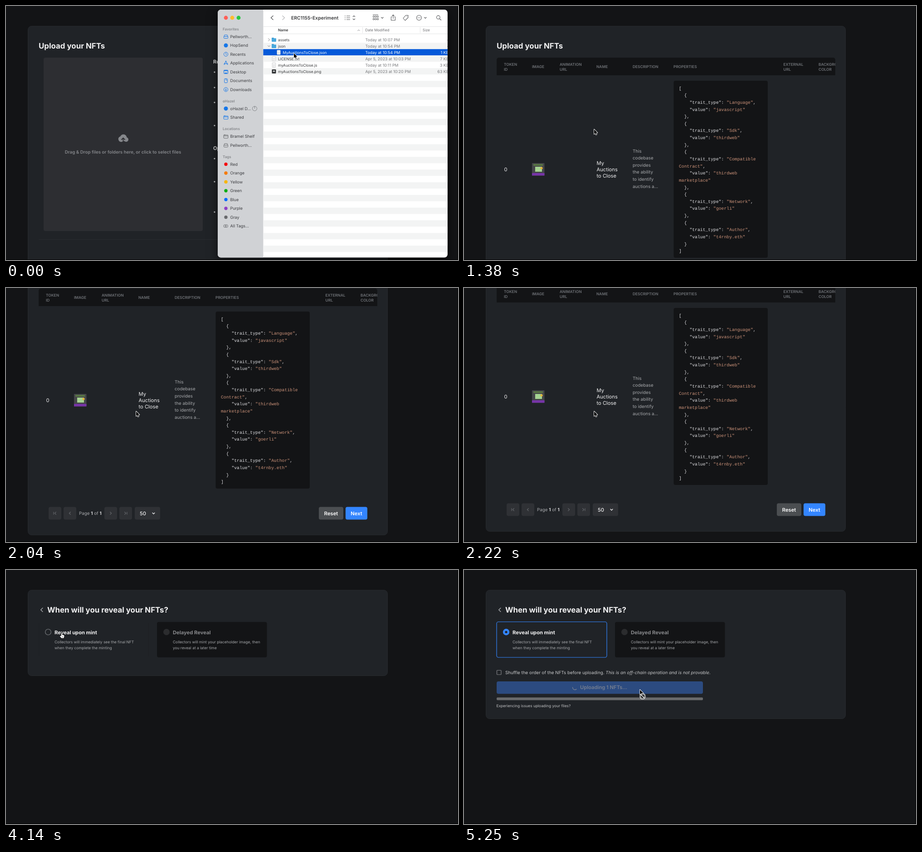
An HTML page with a canvas that plays this animation: 997 px wide and 561 px high, repeating every 5730 ms.

```html
<!DOCTYPE html>
<html lang="en">
<head>
<meta charset="utf-8">
<style>
html, body { margin: 0; width: 100%; height: 100%; overflow: hidden; background: #131416; }
canvas { display: block; }
</style>
</head>
<body>
<canvas id="stage" width="997" height="561"></canvas>
<script>
const ctx = document.getElementById('stage').getContext('2d');
ctx.textRendering = 'geometricPrecision';
const LOOP = 5730;
const SANS = 'Inter, "Open Sans", sans-serif';
const MONO = '"Liberation Mono", "DejaVu Sans Mono", monospace';
const DARK = '#131416', CARD = '#202327', EDGE = '#272a2e', BLUE = '#3385ff', WHITE = '#f1f1f2', GREY = '#a7a9ac';
const TITLE = 16.87, BODY = 11.2;

// ---- drawing helpers ----
function box(x, y, w, h, r, fill, stroke, lw = 1) {
  ctx.beginPath();
  ctx.roundRect(x, y, w, h, r);
  if (fill) { ctx.fillStyle = fill; ctx.fill(); }
  if (stroke) { ctx.strokeStyle = stroke; ctx.lineWidth = lw; ctx.stroke(); }
}
function card(h) {
  box(48.5, 44.5, 793, h - 1, 8, CARD, EDGE);
}
function dot(x, y, r, fill, stroke, lw = 1) {
  box(x - r, y - r, 2 * r, 2 * r, r, fill, stroke, lw);
}
function line(color, lw, ...paths) {
  ctx.strokeStyle = color;
  ctx.lineWidth = lw;
  ctx.beginPath();
  for (const p of paths)
    for (let i = 0; i < p.length; i += 2) ctx[i ? 'lineTo' : 'moveTo'](p[i], p[i + 1]);
  ctx.stroke();
}
function poly(points, fill, stroke, lw = 1) {
  ctx.beginPath();
  for (let i = 0; i < points.length; i += 2) ctx.lineTo(points[i], points[i + 1]);
  ctx.closePath();
  if (stroke) { ctx.strokeStyle = stroke; ctx.lineWidth = lw; ctx.stroke(); }
  ctx.fillStyle = fill;
  ctx.fill();
}
// Text whose capitals are centred on y.
function text(s, x, y, size, color = WHITE, weight = 400, align = 'left', family = SANS) {
  ctx.font = `${weight} ${size}px ${family}`;
  ctx.fillStyle = color;
  ctx.textAlign = align;
  ctx.fillText(s, x, y + size * 0.36);
}
function chevron(x, y, dx, dy, color, lw = 1.2) {
  line(color, lw, dx ? [x - dx, y - dy, x + dx, y, x - dx, y + dy] : [x - dy, y - dy / 2, x, y + dy / 2, x + dy, y - dy / 2]);
}
function clipped(x, y, w, h, r, draw) {
  ctx.save();
  ctx.beginPath();
  ctx.roundRect(x, y, w, h, r);
  ctx.clip();
  draw();
  ctx.restore();
}

// ---- motion helpers ----
const part = (t, a, b) => Math.min(1, Math.max(0, (t - a) / (b - a)));
const inOut = p => p < 0.5 ? 4 * p ** 3 : 1 - (2 - 2 * p) ** 3 / 2;
const out = p => 1 - (1 - p) ** 3;
const moves = [
  [510, 1000, 286, 272],
  [2300, 2800, 785, 486],
  [3680, 4120, 121, 139],
  [4270, 4700, 387, 264]
];
function pointer(t) {
  let x = 634, y = 104;
  for (const [a, b, tx, ty] of moves) {
    const p = inOut(part(t, a, b));
    x += (tx - x) * p;
    y += (ty - y) * p;
  }
  return [x, y];
}

// ---- cursors ----
function arrow(x, y) {
  ctx.save();
  ctx.translate(x + 0.5, y + 0.3);
  ctx.lineJoin = 'round';
  poly([0.6, 0.2, 0.6, 10.6, 3, 8.5, 4.6, 12, 6.2, 11.3, 4.7, 7.9, 7.9, 7.6], '#000', '#fff', 1.8);
  ctx.restore();
}
function hand(x, y) {
  ctx.save();
  ctx.translate(x + 1.5, y);
  ctx.lineJoin = 'round';
  poly([-.8, 0, .8, 0, 1.2, 4, 5.6, 5, 6, 7, 5, 11.5, -.2, 11.5, -3.6, 7.4, -3, 6, -.8, 7.2], '#fff', '#000', 1.4);
  line('#555', .6, [1.4, 7, 1.4, 10], [3.2, 7, 3.2, 10]);
  ctx.restore();
}

// ---- upload page ----
const notes = [
  [146, 'Files must contain one .csv or .json file with', 'metadata.'],
  [180, 'The csv must have a name column, which', 'defines the name of the NFT.'],
  [213, 'Asset names must be sequential 0,1,2,3...n', 'with a matching extension. It does not matter', 'at which number you begin.'],
  [264, 'Make sure to drag and drop the files and the', 'assets at the same time.'],
  [337, 'If you want to map your media files to your', 'NFTs, you can add the name of your files to', 'the image and animation_url column.'],
  [388, 'When uploading files, we will upload them and', 'pin them to IPFS automatically for you. If you', 'already have the files uploaded, you can add', 'the URL to the image column.'],
  [455, 'If you want to make your own collection, add', 'an external_url column.']
];
function uploadPage(over) {
  card(615);
  text('Upload your NFTs', 72, 88, TITLE, WHITE, 700);
  box(83, 114, 351, 383, 4, '#2d2e32');
  for (const [x, y, r] of [[254, 294, 6.2], [259, 291, 7.5], [265, 295, 5]]) dot(x, y, r, '#85878b');
  line('#2d2e32', 1.8, [258.5, 304, 258.5, 292], [254.5, 295.5, 258.5, 291.5, 262.5, 295.5]);
  text(over ? 'Drop the files here' : 'Drag & Drop files or folders here, or click to select files',
    258, 322, 9.8, '#85878b', 600, 'center');
  text('Requirements', 457, 123, BODY, WHITE, 600);
  text('Options', 457, 314, BODY, WHITE, 600);
  for (const [y, ...lines] of notes) {
    dot(460, y, 1.6, '#d0d1d2');
    lines.forEach((s, i) => text(s, 468, y + i * 16.8, 9.8, '#d0d1d2'));
  }
  line('#292c30', 1, [72, 515.5, 818, 515.5]);
}

// ---- file window ----
const places = [
  ['Favorites', 51], ['Pellworth...', 67.5, 'disk'], ['HopSend', 87, 'mark'], ['Recents', 106.5, 'clock'],
  ['Applications', 126, 'apps'], ['Desktop', 145.5, 'screen'], ['Documents', 165, 'doc'], ['Downloads', 184.5, 'down'],
  ['oHazel', 210], ['oHazel D...', 226.5, 'mark'], ['Shared', 246, 'folder'],
  ['Locations', 271.5], ['Bramel Shelf', 288, 'folder', '#66686b'], ['Pellworth...', 307.5, 'disk', '#66686b'],
  ['Tags', 333]
];
const tags = [['Red', '#f5050c'], ['Orange', '#f57a00'], ['Yellow', '#f7b500'], ['Green', '#0bac12'],
  ['Blue', '#0a6cff'], ['Purple', '#8f3fc4'], ['Gray', '#68696c']];
const files = [
  ['assets', 'Today at 10:07 PM', '-', 'dir'],
  ['json', 'Today at 10:54 PM', '-', 'dir'],
  ['MyAuctionsToClose.json', 'Today at 10:54 PM', '1 KB', 'doc'],
  ['LICENSE.txt', 'Apr 5, 2023 at 10:03 PM', '7 KB', 'doc'],
  ['myAuctionsToClose.js', 'Today at 10:11 PM', '3 KB', 'doc'],
  ['myAuctionsToClose.png', 'Apr 5, 2023 at 10:20 PM', '63 KB', 'img']
];
const placeIcons = {
  disk(c) { box(-4.5, 0, 9, 4, 1, null, c); line(c, 1, [-4.5, 1, -3, -3.5, 3, -3.5, 4.5, 1]); },
  mark() { dot(0, 0, 4.5, '#1677e8'); },
  clock(c) { dot(0, 0, 4.5, null, c); line(c, 1, [0, -3, 0, 0, 2, 1]); },
  apps(c) { line(c, 1.1, [-4, 4, 0, -4.5, 4, 4], [-4.5, 1.5, 4.5, 1.5]); },
  screen(c) { box(-4.5, -4, 9, 8, 1, null, c); line(c, 1.4, [-4, -2.5, 4, -2.5], [-3, 2.5, 3, 2.5]); },
  doc(c) { box(-3.2, -4.5, 6.4, 9, 1, null, c); line(c, .8, [0, -4, 0, -1.5, 3, -1.5]); },
  down(c) { dot(0, 0, 4.5, null, c); line(c, 1, [0, -2.5, 0, 2.5], [-2, .5, 0, 2.5, 2, .5]); },
  folder(c) { box(-4.8, -3, 9.6, 7, 1, null, c); line(c, 1, [-4.5, -1, 4.5, -1], [-4.5, -3.6, -1, -3.6]); }
};
function fileIcon(kind, x, y) {
  if (kind === 'dir') {
    box(x - 5, y - 4.5, 5, 4, 1, '#3593c9');
    box(x - 5, y - 3.3, 10, 7.8, 1, '#49a9dd');
  } else if (kind === 'img') {
    box(x - 4.5, y - 4.5, 9, 9, 1, '#303234');
    box(x - 2, y - 2, 4, 3, 0, '#c8cbcc');
  } else {
    box(x - 3.7, y - 5, 7.4, 10, .8, '#fafafa', '#b9bbbd', .7);
    line('#c9cbcd', .7, [x - 2, y - 1, x + 2, y - 1], [x - 2, y + 1, x + 2, y + 1], [x - 2, y + 3, x + 1, y + 3]);
  }
}
function toolbar() {
  const c = '#5d5e61';
  ['#ff5f57', '#febc2e', '#28c840'].forEach((f, i) => dot(485 + 14 * i, 26, 4.4, f));
  chevron(587, 26, -2.5, 4.8, c, 1.4);
  chevron(612, 26, 2.5, 4.8, '#bcbdbf', 1.4);
  text('ERC1155-Experiment', 629, 26, 10.4, '#38393b', 600);
  for (const y of [22, 26, 30]) line(c, 1.2, [747, y, 749, y], [751, y, 759, y]);
  line(c, 1.2, [765, 24, 767.5, 21.5, 770, 24], [765, 28, 767.5, 30.5, 770, 28]);
  for (let i = 0; i < 6; i++) box(809.5 + i % 3 * 4.5, 22 + (i / 3 | 0) * 5.5, 3, 3, .5, null, c);
  line(c, 1, [809, 19.5, 821, 19.5]);
  chevron(830, 26, 0, 2.5, c);
  line(c, 1.1, [851.5, 24, 849.5, 24, 849.5, 31.5, 858.5, 31.5, 858.5, 24, 856.5, 24], [854, 28, 854, 19.5], [851.5, 22, 854, 19.5, 856.5, 22]);
  line(c, 1.1, [876, 27, 882, 20.5, 887, 20.5, 887, 25.5, 880.5, 32, 876, 27]);
  dot(884.5, 23, .8, c);
  dot(911, 26, 5.5, null, c, 1.1);
  for (const x of [908.5, 911, 913.5]) dot(x, 26, .8, c);
  chevron(925, 26, 0, 2.5, c);
  dot(953.5, 25, 3.8, null, c, 1.2);
  line(c, 1.3, [956.3, 28, 960, 31.5]);
}
function fileWindow() {
  ctx.save();
  ctx.shadowColor = 'rgba(0,0,0,.6)';
  ctx.shadowBlur = 22;
  ctx.shadowOffsetY = 6;
  box(467, 8, 507, 547.5, 7, '#fff');
  ctx.restore();
  clipped(467, 8, 507, 547.5, 7, () => {
    box(467, 8, 100.5, 548, 0, '#d0d2d5');
    for (const [name, y, icon, color = '#1677e8'] of places) {
      if (!icon) { text(name, 478, y, 8, '#85878b', 600); continue; }
      ctx.save();
      ctx.translate(485, y);
      placeIcons[icon](color);
      ctx.restore();
      text(name, 494.5, y, 9, '#3c3d40');
    }
    dot(548.5, 226.5, 5, null, '#77797c', .9);
    line('#77797c', .9, [548.5, 221.5, 548.5, 226.5]);
    tags.forEach(([name, color], i) => {
      dot(485, 349.5 + i * 19.5, 3.7, color);
      text(name, 494.5, 349.5 + i * 19.5, 9, '#3c3d40');
    });
    dot(483, 486, 3, null, '#66686b', .9);
    dot(486.5, 486, 3, null, '#66686b', .9);
    text('All Tags...', 494.5, 486, 9, '#3c3d40');

    toolbar();
    line('#e4e5e6', 1, [567, 45.5, 974, 45.5], [567, 61.5, 974, 61.5], [786.5, 47, 786.5, 60], [913.5, 47, 913.5, 60]);
    text('Name', 600, 53.5, 8, '#38393b', 600);
    line('#858688', 1, [775.5, 55, 778, 52.5, 780.5, 55]);
    text('Date Modified', 792.5, 53.5, 8, '#6e6f72');
    text('Size', 919, 53.5, 8, '#6e6f72');
    for (let i = 1; i < 36; i += 2) box(567.5, 67.3 + i * 14, 407, 14, 0, '#f3f4f4');
    box(567.5, 95.3, 407, 13.7, 0, '#0459d9');
    files.forEach(([name, date, size, kind], i) => {
      const y = 74.5 + 14 * i, on = i === 2, dx = on ? 10.5 : 0;
      fileIcon(kind, 591 + dx, y);
      text(name, 600 + dx, y, 8.4, on ? '#fff' : '#38393b');
      text(date, 792.5, y, 8.8, on ? '#fff' : '#77787b');
      text(size, 976.5, y, 8.8, on ? '#fff' : '#77787b', 400, 'right');
    });
    chevron(580, 74.5, 1.5, 3, '#77787b', 1);
    chevron(580, 88.5, 0, 2.6, '#77787b', 1);
  });
}
function dragged(x, y, over) {
  fileIcon('doc', x - 32, y);
  box(x - 27, y - 6, 112, 12.3, 6, '#1459c4');
  text('MyAuctionsToClose.json', x - 23, y, 8.4, '#fff');
  dot(x, y + 1, 27.5, null, 'rgba(235,235,235,.8)', 1);
  dot(x, y + 1, 25.8, null, 'rgba(150,150,150,.45)', .8);
  arrow(x, y);
  if (over) {
    dot(x + 6.5, y + 15, 6, '#1fb434', '#e8f5ea', .8);
    line('#fff', 1.6, [x + 3, y + 15, x + 10, y + 15], [x + 6.5, y + 11.5, x + 6.5, y + 18.5]);
  }
}

// ---- table page ----
const heads = [[88, 'TOKEN', 'ID'], [150, 'IMAGE'], [211, 'ANIMATION', 'URL'], [292, 'NAME'], [372, 'DESCRIPTION'],
  [462, 'PROPERTIES'], [704.5, 'EXTERNAL', 'URL'], [782, 'BACKGROUND', 'COLOR']];
const traits = [['Language', 'javascript'], ['Sdk', 'thirdweb'], ['Compatible\nContract', 'thirdweb\nmarketplace'],
  ['Network', 'goerli'], ['Author', 't4rnby.eth']];
const code = ['[', ...traits.flatMap(([type, value], i) => [
  '  {',
  ...`    "trait_type": "${type}",`.split('\n'),
  ...`    "value": "${value}"`.split('\n'),
  i < traits.length - 1 ? '  },' : '  }'
]), ']'];
function codeLine(s, y) {
  const at = s.includes(': ') ? s.indexOf(': ') + 2 : /^[A-Za-z]/.test(s) ? 0 : s.length;
  const comma = s.endsWith(',') && at < s.length ? s.length - 1 : s.length;
  const put = (a, b, color) => text(s.slice(a, b), 474 + a * 5.85, y, 9.75, color, 400, 'left', MONO);
  put(0, at, '#dddde0');
  put(at, comma, '#cb9279');
  put(comma, s.length, '#dddde0');
}
function button(x, y, w, label, fill) {
  box(x, y - 14, w, 28, 4, fill);
  text(label, x + w / 2, y, BODY, '#fff', 600, 'center');
}
function tablePage(scroll) {
  ctx.save();
  ctx.translate(0, -scroll);
  card(615);
  text('Upload your NFTs', 72, 88, TITLE, WHITE, 700);
  clipped(72, 114, 747, 39, [5, 5, 0, 0], () => {
    box(72, 114, 747, 39, 0, DARK);
    for (const [x, a, b] of heads) {
      text(a, x, b ? 128.7 : 134.3, 8.4, '#6f7277', 600);
      if (b) text(b, x, 139.8, 8.4, '#6f7277', 600);
    }
  });
  text('0', 88.5, 360.5, BODY);
  box(150, 347, 27.5, 27.5, 1, '#45464a');
  box(153, 349, 21, 4, 0, '#577443');
  box(157, 355, 15, 11, 0, '#a5d391');
  dot(171, 358, 2.6, '#e0b23c');
  box(150, 369, 27.5, 5.5, 0, '#7634a8');
  ['My', 'Auctions', 'to Close'].forEach((s, i) => text(s, 292.5, 347 + i * 13.9, BODY));
  ['This', 'codebase', 'provides', 'the ability', 'to identify', 'auctions a...']
    .forEach((s, i) => text(s, 372, 320 + i * 15.65, 9.8, GREY));
  box(462.5, 165, 207.5, 391, 4, DARK);
  code.forEach((s, i) => codeLine(s, 181.2 + i * 15.63));

  const y = 610.5, dim = '#63666a';
  for (const x of [94, 127, 217, 250]) box(x, y - 14, 28, 28, 4, '#2f3135');
  chevron(109, y, -1.6, 3, dim);
  line(dim, 1.2, [105, y - 3, 105, y + 3]);
  chevron(141, y, -1.6, 3, dim);
  chevron(231, y, 1.6, 3, dim);
  chevron(263, y, 1.6, 3, dim);
  line(dim, 1.2, [267, y - 3, 267, y + 3]);
  let x = 161;
  for (const [s, w] of [['Page ', 400], ['1', 700], [' of ', 400], ['1', 700]]) {
    text(s, x, y, 9.8, w === 700 ? '#dcdddf' : GREY, w);
    x += ctx.measureText(s).width;
  }
  box(284, y - 14, 56, 28, 4, '#2f3135');
  text('50', 295, y, BODY, WHITE, 500);
  chevron(325.5, y, 0, 2.8, WHITE, 1.4);
  button(690, y, 54, 'Reset', '#4b4e51');
  button(749, y, 48, 'Next', BLUE);
  ctx.restore();
}

// ---- reveal page ----
function option(x, title, lines, color) {
  text(title, x, 137.5, BODY, color, 700);
  lines.forEach((s, i) => text(s, x, 158.5 + i * 13.8, 8.4, GREY));
}
function revealPage(t) {
  const chosen = t >= 4200, busy = t >= 4770;
  card(busy ? 285 : chosen ? 254 : 190);
  chevron(79, 88, -2.3, 4.5, '#b0b2b5', 1.3);
  text('When will you reveal your NFTs?', 91, 88, TITLE, WHITE, 700);

  if (chosen) {
    box(72, 114.5, 243, 78.5, 4, null, BLUE, 1.2);
    dot(93, 137, 7.2, BLUE);
    dot(93, 137, 2.6, CARD);
  } else {
    line('#1d1f23', 1, [72.5, 117, 72.5, 191], [314.5, 117, 314.5, 191]);
    dot(93, 137, 6.4, null, '#6b6e72', 1.4);
  }
  option(107, 'Reveal upon mint', ['Collectors will immediately see the final NFT', 'when they complete the minting'], WHITE);
  box(333, 114.7, 242.5, 78.3, 4, DARK);
  dot(354, 137, 7, '#2b2c2e');
  option(368, 'Delayed Reveal', ['Collectors will mint your placeholder image, then', 'you reveal at a later time'], '#87888b');

  if (!chosen) return;
  box(72.5, 221.5, 9.5, 9.5, 1, null, '#818386', 1.2);
  const lead = 'Shuffle the order of the NFTs before uploading. ';
  text(lead, 91, 226, 9.8, '#c6c7c9');
  text('This is an off-chain operation and is not provable.', 91 + ctx.measureText(lead).width, 226, 9.8, '#c6c7c9', 'italic 400');
  if (!busy) {
    box(72, 246, 455, 27.5, 4, BLUE);
    text('Upload 1 NFTs', 299.5, 259.3, BODY, '#fff', 600, 'center');
    return;
  }
  const fade = part(t, 4770, 4950);
  box(72, 246, 455, 27.5, 4, '#2c4b80');
  ctx.globalAlpha = 1 - fade;
  box(72, 246, 455, 27.5, 4, BLUE);
  ctx.globalAlpha = 1;
  text('Uploading 1 NFTs...', 256, 259.3, BODY, '#777f8f', 600);
  const turn = (Math.min(t, 5250) - 5250) / 450 * 2 * Math.PI;
  ctx.strokeStyle = '#777f8f';
  ctx.lineWidth = 1.4;
  ctx.beginPath();
  ctx.arc(244.5, 259.5, 5, turn + .7, turn + 3.3);
  ctx.stroke();
  box(72, 281.5, 455, 6, 2, '#6a6b6d');
  text('Experiencing issues uploading your files?', 71.5, 299.5, 8.4, '#c0c1c3');
}

// ---- timeline ----
function draw(t) {
  const [x, y] = pointer(t);
  ctx.fillStyle = DARK;
  ctx.fillRect(0, 0, 997, 561);
  if (t < 1110) {
    const drag = t >= 510 && t < 1080, over = drag && x < 434;
    uploadPage(over);
    if (t < 1080) fileWindow();
    if (drag) dragged(x, y, over);
    else arrow(x, y);
  } else if (t < 3090) {
    tablePage(121 * out(part(t, 1800, 2205)));
    if (x > 749 && y > 475) hand(x, y);
    else arrow(x, y);
  } else {
    revealPage(t);
    const onOption = x > 72 && x < 315 && y > 114 && y < 193;
    const onButton = t >= 4200 && t < 4770 && y > 246 && y < 274;
    if (onOption || onButton) hand(x, y);
    else arrow(x, y);
    if (t >= 4770) {
      dot(x + 7, y + 15, 5.2, '#111', '#fff', 3);
      dot(x + 7, y + 15, 5.2, null, '#111', 1);
      line('#fff', 1.5, [x + 3.5, y + 11.5, x + 10.5, y + 18.5]);
    }
  }
  ctx.fillStyle = '#000';
  ctx.fillRect(996, 0, 1, 561);
  ctx.fillRect(0, 560, 997, 1);
}
const start = performance.now();
function tick() {
  draw((performance.now() - start) % LOOP);
  requestAnimationFrame(tick);
}
tick();
</script>
</body>
</html>
```
